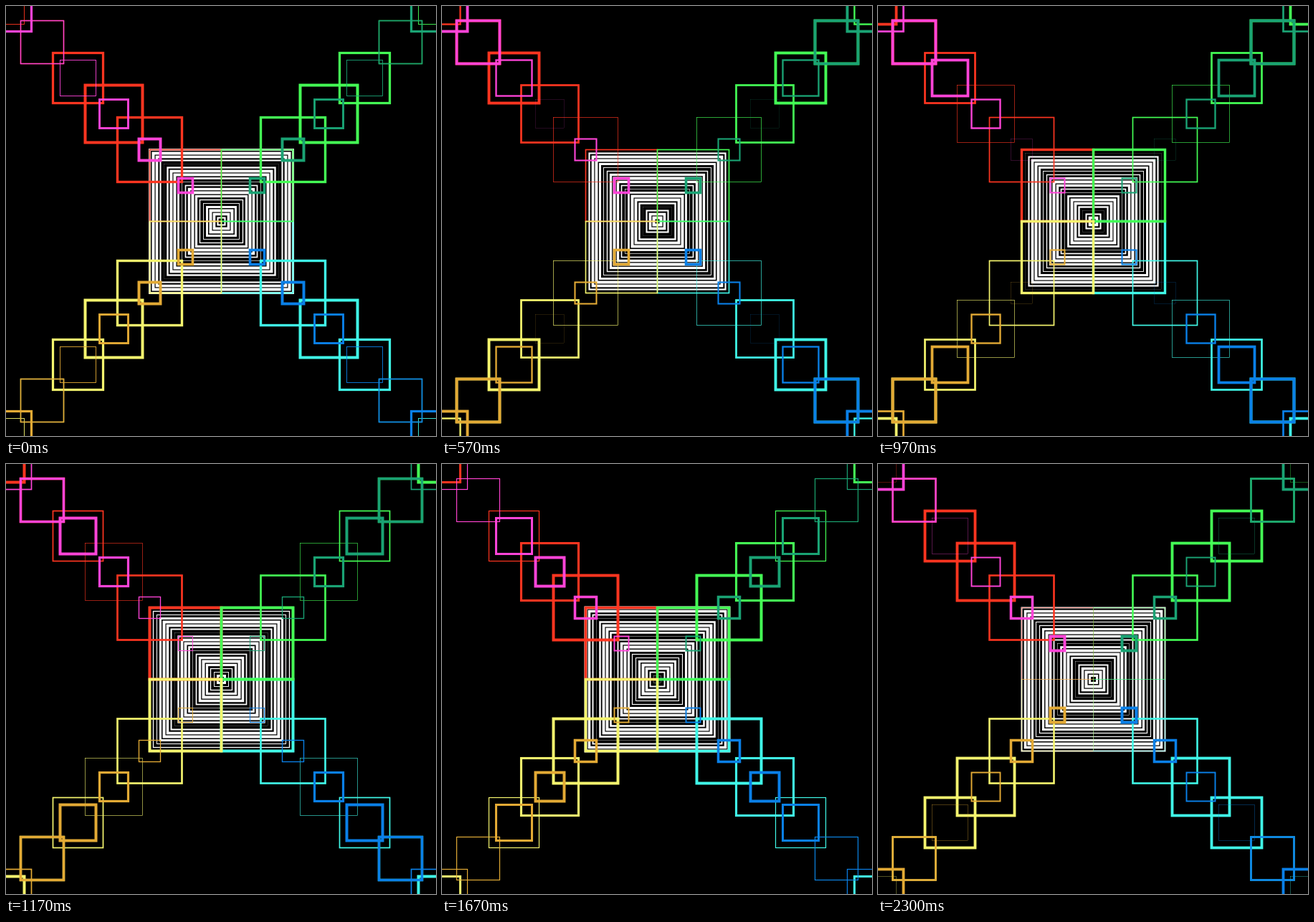
An HTML page with a canvas that plays this animation: 600 by 600 pixels, repeating every 2330 ms.

```html
<!DOCTYPE html>
<html lang="en">
<head>
<meta charset="utf-8">
<title>Pulsing squares</title>
<style>
  html, body { margin: 0; width: 100%; height: 100%; overflow: hidden; background: #000; }
  canvas { display: block; width: 600px; height: 600px; }
</style>
</head>
<body>
<canvas id="stage" width="600" height="600"></canvas>
<script>
const ctx = document.getElementById('stage').getContext('2d');
const LOOP = 2330, STEP = 100 / 3, LAST = 69;

// Direction from the centre, outer chain colour, inner chain colour
const ARMS = [
  [-1, -1, '#ff3520', '#ff44d8'],
  [1, 1, '#40f8e8', '#0a80e8'],
  [1, -1, '#44ff55', '#1aa374'],
  [-1, 1, '#f5f56e', '#e3aa35']
];

// Line weight is a wave that depends on the square's size
const weight = (size, n) => 4 * Math.abs(Math.sin((n - 0.5) / 20 + size / 17));

function square(x, y, size, color, n) {
  ctx.strokeStyle = color;
  ctx.lineWidth = Math.max(0.01, weight(size, n));
  ctx.strokeRect(x - size / 2 + 0.5, y - size / 2 + 0.5, size, size);
}

function chain(dx, dy, color, first, change, n) {
  for (let i = 0; i < 6; i++) {
    const d = 300 - 50 * i;
    square(300 + dx * d, 300 + dy * d, first + change * i, color, n);
  }
}

function draw(n) {
  ctx.fillStyle = '#000';
  ctx.fillRect(0, 0, 600, 600);
  for (let size = 200; size > 0; size -= 10) square(300, 300, size, '#fff', n);
  for (const [dx, dy, outer] of ARMS) chain(dx, dy, outer, 50, 10, n);
  for (const [dx, dy, , inner] of ARMS) chain(dx, dy, inner, 70, -10, n);
}

const start = performance.now();
function tick() {
  const t = (performance.now() - start) % LOOP;
  draw(Math.min(LAST, Math.floor((t + 3.4) / STEP)));
  requestAnimationFrame(tick);
}
tick();
</script>
</body>
</html>
```
